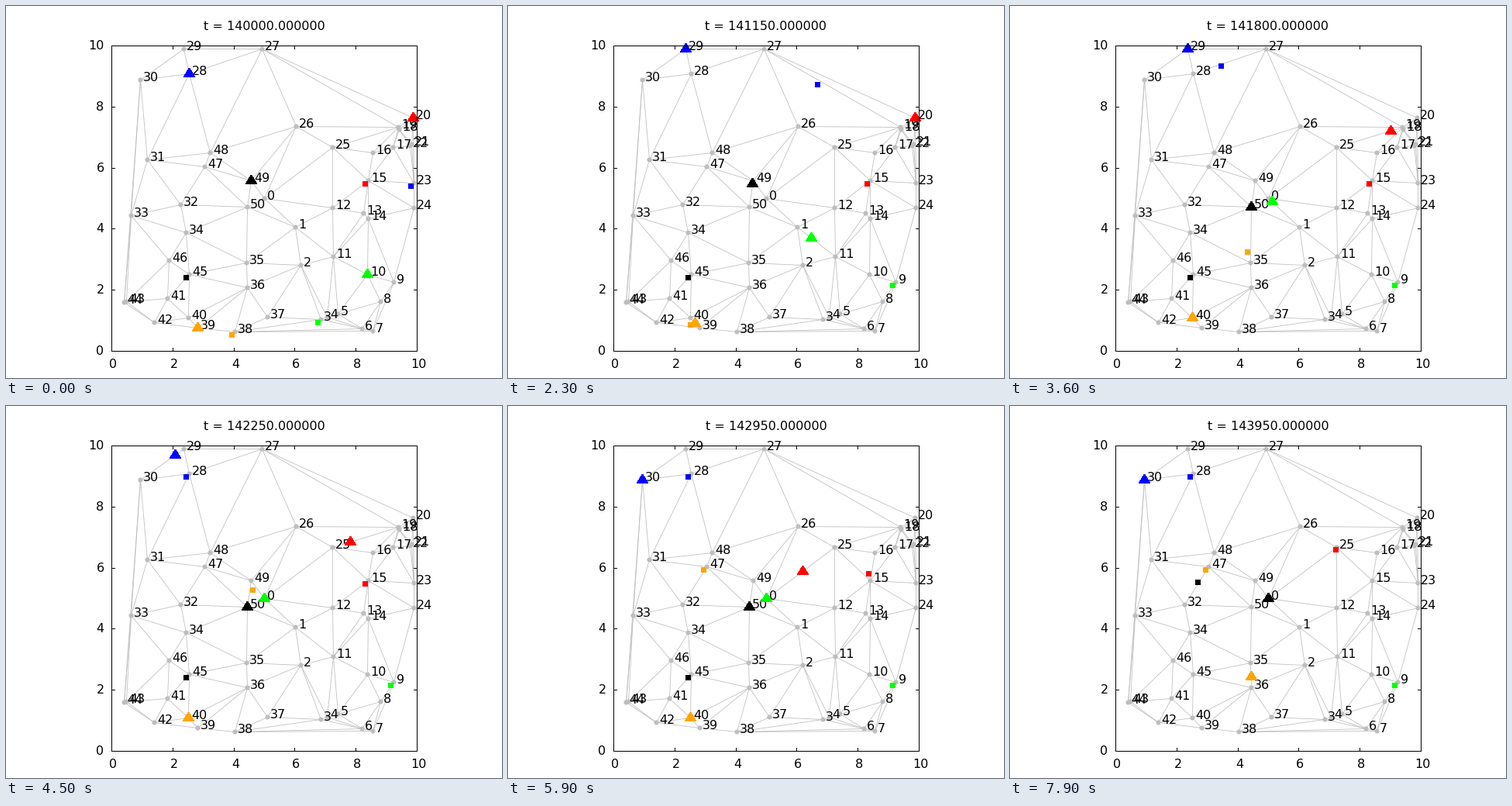
Write a matplotlib script that moves like this. It is 640 by 480 pixels and loops after 8 s.

```python
import numpy as np
import matplotlib.pyplot as plt
from matplotlib.animation import FuncAnimation
from matplotlib.patches import Circle, Polygon
from matplotlib.tri import Triangulation

W, H, DPI = 640, 480, 80
FRAMES, INTERVAL = 80, 100
PX = 72 / DPI                      # one pixel in points
LEFT, RIGHT, TOP, BOTTOM = 136, 530, 51, 445
UNIT = (RIGHT - LEFT) / 10
GRAY = "#bebebe"
STEP = 5.43                        # triangle pixels per frame; squares go twice as fast

# Graph nodes in pixels, in the order of their labels
NODES = np.array([
    (333, 248), (373, 285), (380, 334), (406, 404), (414, 401), (428, 397),
    (459, 416), (473, 419), (483, 381), (500, 356), (466, 346), (422, 323),
    (421, 260), (461, 267), (467, 274), (467, 225), (473, 189), (499, 182),
    (507, 159), (506, 156), (525, 144), (523, 178), (521, 180), (526, 228),
    (526, 260), (421, 182), (374, 155), (330, 55), (236, 87), (229, 55),
    (173, 95), (182, 198), (225, 256), (161, 270), (232, 292), (310, 331),
    (311, 363), (337, 401), (295, 420), (247, 415), (235, 402), (208, 377),
    (191, 408), (155, 381), (152, 382), (236, 346), (210, 328), (256, 207),
    (263, 189), (316, 225), (311, 259),
])
EDGES = Triangulation(*NODES.T).edges

# Trips of each triangle and square: (start frame, stops)
AGENTS = [
    ("#ff0000", [(29, [20, 0])], [(57.8, [15, 16, 17, 21, 20, 25])]),
    ("#00ff00", [(6.6, [10, 0])], [(1.1, [3, 7, 8, 9])]),
    ("#0000ff", [(1, [28, 29]), (42.4, [29, 30])], [(5, [23, 28])]),
    ("#ffa500", [(21.4, [39, 40]), (60.7, [40, 35])],
     [(17.5, [38, 40, 0, 49, 48, 47])]),
    ("#000000", [(22.2, [49, 50]), (66, [50, 0])], [(65.2, [45, 46, 47])]),
]

# Edge lengths and all shortest distances (Floyd-Warshall)
count = len(NODES)
hop = np.full((count, count), np.inf)
for a, b in EDGES:
    hop[a, b] = hop[b, a] = np.hypot(*(NODES[a] - NODES[b]))
dist = hop.copy()
np.fill_diagonal(dist, 0)
for k in range(count):
    dist = np.minimum(dist, dist[:, k, None] + dist[k])


def route(stops):
    """Shortest path along the edges through all stops."""
    path = [stops[0]]
    for goal in stops[1:]:
        while path[-1] != goal:
            path.append(int(np.argmin(hop[path[-1]] + dist[goal])))
    return NODES[path]


def plan(trips):
    """Turn stops into (start, points, distance run at each point)."""
    legs = []
    for start, stops in trips:
        pts = route(stops)
        run = np.r_[0, np.cumsum(np.hypot(*np.diff(pts, axis=0).T))]
        legs.append((start, pts, run))
    return legs


def walk(legs, step, n):
    """Whole-pixel position at frame n."""
    start, pts, run = next((g for g in reversed(legs) if g[0] <= n), legs[0])
    d = max(0, (n - start) * step)
    return np.round([np.interp(d, run, pts[:, 0]), np.interp(d, run, pts[:, 1])])


plt.rcParams["font.family"] = "DejaVu Sans"
plt.rcParams["font.size"] = 16 * PX
fig = plt.figure(figsize=(W / DPI, H / DPI), dpi=DPI, facecolor="white")
ax = fig.add_axes([0, 0, 1, 1])
ax.set_xlim(-0.5, W - 0.5)         # whole numbers are pixel centres
ax.set_ylim(H - 0.5, -0.5)
ax.axis("off")


def write(x, y, s, ha="left"):
    return ax.text(x, y, s, ha=ha, va="baseline", color="black", zorder=3)


def line(xs, ys, color, width, z):
    ax.plot(xs, ys, color=color, lw=width * PX, snap=False, zorder=z,
            solid_capstyle="projecting")


def draw_axes():
    line([LEFT, RIGHT, RIGHT, LEFT, LEFT], [TOP, TOP, BOTTOM, BOTTOM, TOP],
         "black", 1, 6)
    for v in range(0, 11, 2):
        x, y = round(LEFT + v * UNIT), round(BOTTOM - v * UNIT)
        write(x + 1.5, 466.5, str(v), "center")
        write(126, y + 4.5, str(v), "right")
        for edge, d in ((TOP, 4), (BOTTOM, -4)):
            line([x, x], [edge, edge + d], "black", 1, 6)
        for edge, d in ((LEFT, 4), (RIGHT, -4)):
            line([edge, edge + d], [y, y], "black", 1, 6)


def draw_graph():
    for edge in EDGES:
        line(*NODES[edge].T, GRAY, 0.8, 1)
    for i, (x, y) in enumerate(NODES):
        ax.add_patch(Circle((x, y), 3.1, color=GRAY, lw=0, zorder=2))
        write(x + 3.5, y + 1.5, str(i))


def mover(shape, color, z):
    return ax.add_patch(Polygon(shape, closed=True, fc=color, lw=0, ec="none",
                                antialiased=False, snap=False, zorder=z))


TRIANGLE = np.array([(0, -7.5), (-7.5, 4), (7.5, 4)])
SQUARE = 3.5 * np.array([(-1, -1), (1, -1), (1, 1), (-1, 1)]) + (-4, 4)

draw_axes()
draw_graph()
title = write(332.5, 30.5, "", "center")
movers = []
for i, (color, tri, sq) in enumerate(AGENTS):
    for shape, trips, step, z in ((SQUARE, sq, 2 * STEP, 4),
                                  (TRIANGLE, tri, STEP, 4.05)):
        movers.append((mover(shape, color, z + i / 10), shape, plan(trips), step))


def update(n):
    title.set_text(f"t = {140000 + 50 * n:.6f}")
    for patch, shape, legs, step in movers:
        patch.set_xy(shape + walk(legs, step, n))
    return [title] + [m[0] for m in movers]


anim = FuncAnimation(fig, update, frames=FRAMES, interval=INTERVAL,
                     repeat=True, repeat_delay=0, blit=False)
plt.show()
```
